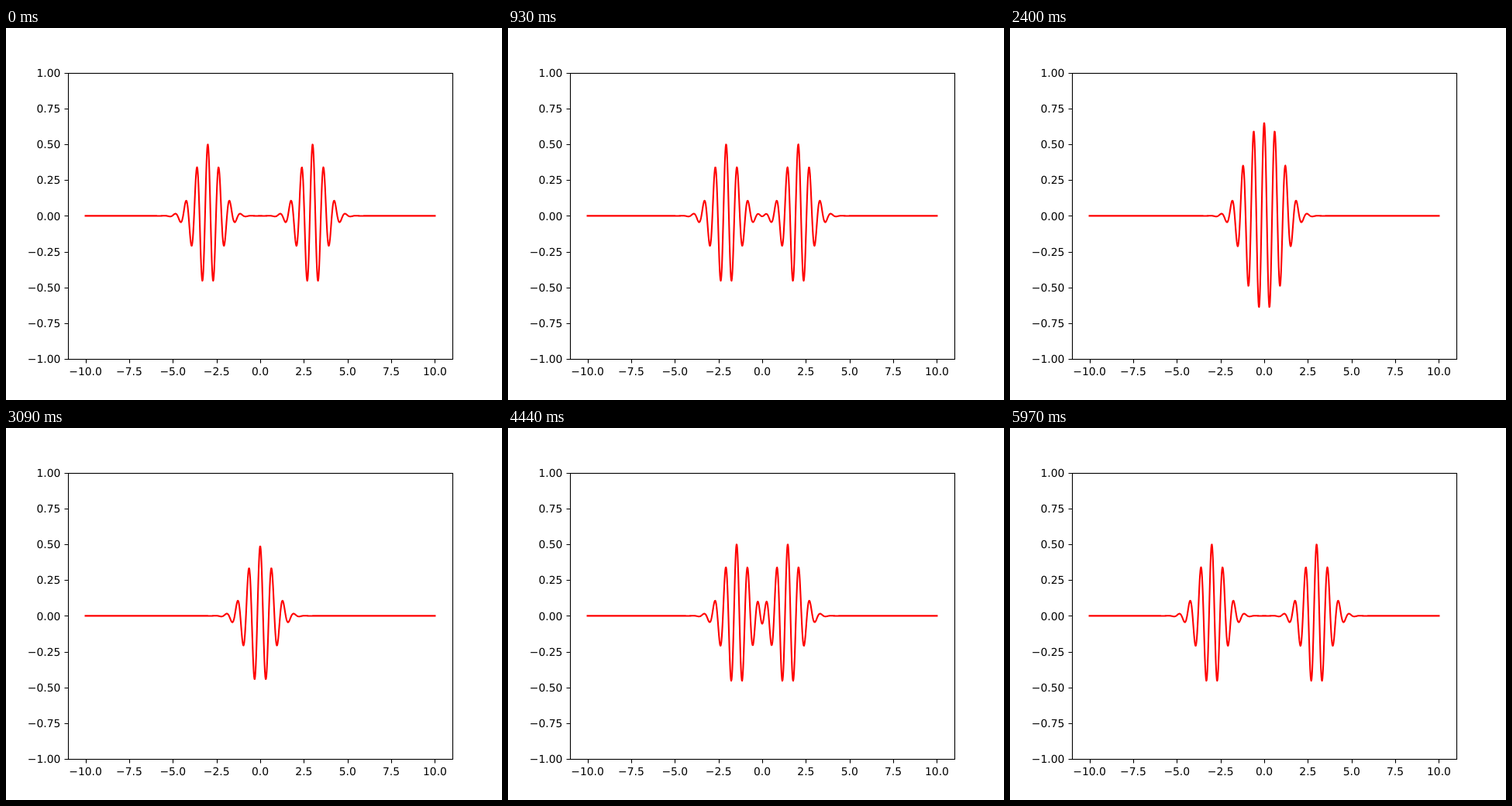
Animation, 640 px wide and 480 px high, one loop 6000 ms. Source, as an HTML page:

```html
<!DOCTYPE html>
<html lang="en">
<head>
<meta charset="utf-8">
<title>Two wave packets</title>
<style>
  html, body { margin: 0; width: 100%; height: 100%; overflow: hidden; background: #fff; }
  svg { display: block; width: 640px; height: 480px; }
  text { font: 13.889px "DejaVu Sans", sans-serif; text-rendering: geometricPrecision; }
  .axes { fill: none; stroke: #000; stroke-width: 1.111; }
  #wave { fill: none; stroke: #f00; stroke-width: 2.083; stroke-linejoin: round; stroke-linecap: square; }
</style>
</head>
<body>
<svg viewBox="0 0 640 480">
  <path id="ticks" class="axes"/>
  <path id="wave"/>
  <rect class="axes" x="80.5" y="58.5" width="496" height="369"/>
  <g id="labels"></g>
</svg>
<script>
const STEP = 30, FRAMES = 200, SAMPLES = 1000;
const get = id => document.getElementById(id);
const toX = x => 328 + x * 496 / 22;
const toY = y => 242.4 - y * 184.8;
const snap = v => Math.floor(v + 0.5) + 0.5;
const format = (v, digits) => v.toFixed(digits).replace('-', '\u2212');

function addLabel(x, y, anchor, content) {
  const label = document.createElementNS('http://www.w3.org/2000/svg', 'text');
  label.setAttribute('x', x);
  label.setAttribute('y', y);
  label.setAttribute('text-anchor', anchor);
  label.textContent = content;
  get('labels').append(label);
}

function drawAxes() {
  let d = '';
  for (let k = -4; k <= 4; k++) {
    const x = toX(k * 2.5), y = toY(k / 4);
    d += `M${snap(x)} 427.5v5M80.5 ${snap(y)}h-5`;
    addLabel(x, 448, 'middle', format(k * 2.5, 1));
    addLabel(70.3, Math.round(y + 5.2), 'end', format(k / 4, 2));
  }
  get('ticks').setAttribute('d', d);
}

// Gaussian envelope around a cosine carrier
const packet = u => 0.5 * Math.exp(-u * u) * Math.cos(10 * u);

function drawWave(frame) {
  const shift = -3 + 6 * frame / (FRAMES - 1);
  const points = Array.from({ length: SAMPLES }, (_, i) => {
    const x = -10 + 20 * i / (SAMPLES - 1);
    const y = packet(x - shift) + packet(x + shift);
    return toX(x).toFixed(2) + ' ' + toY(y).toFixed(2);
  });
  get('wave').setAttribute('d', 'M' + points.join('L'));
}

let shown = -1;
function tick() {
  const frame = Math.floor((performance.now() + 0.5) / STEP) % FRAMES;
  if (frame !== shown) drawWave(shown = frame);
  requestAnimationFrame(tick);
}

drawAxes();
drawWave(0);
requestAnimationFrame(tick);
</script>
</body>
</html>
```
